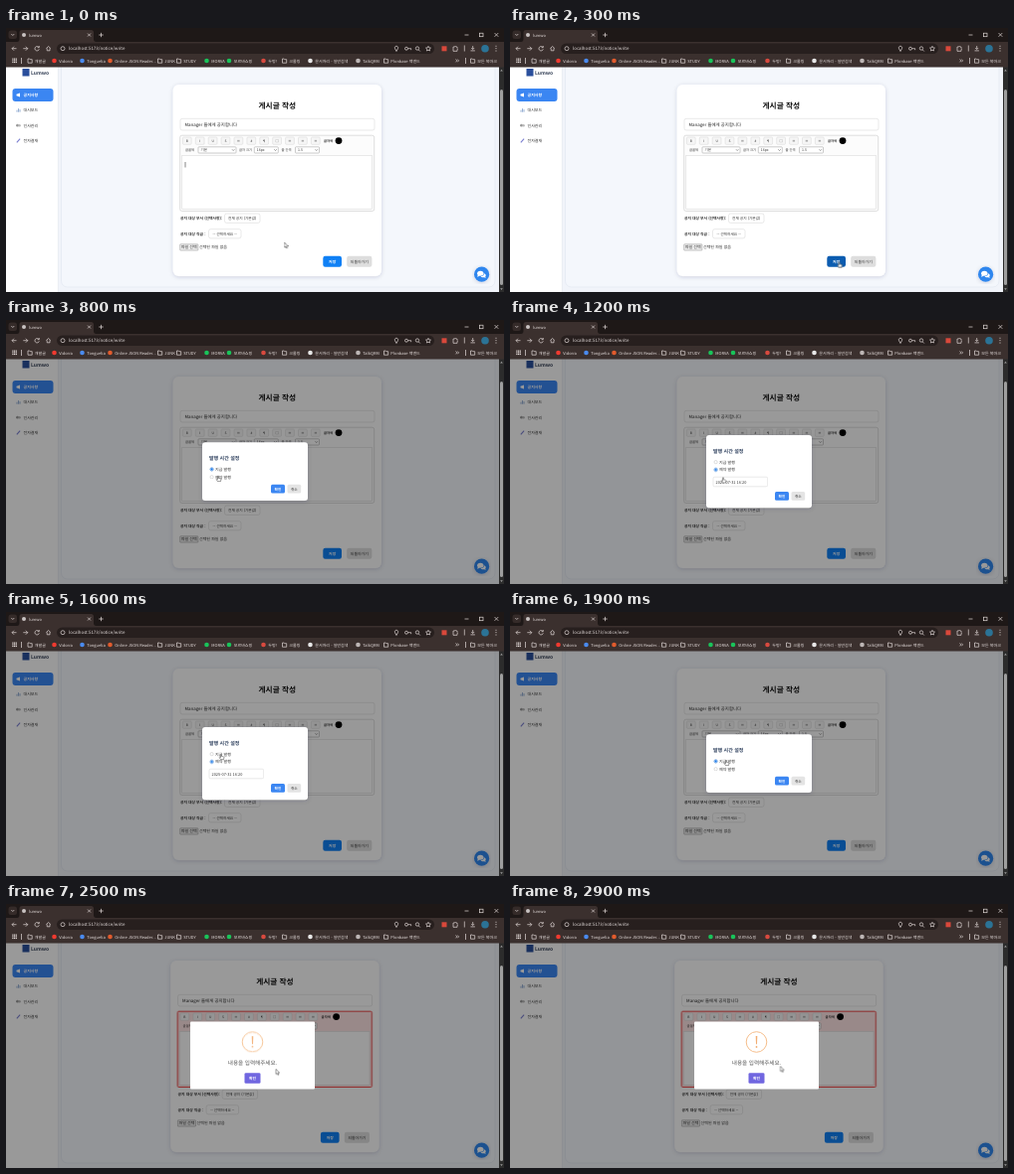
These frames come from a looping animation (500 by 266 pixels, 3 s). An HTML page:

```html
<!DOCTYPE html>
<html lang="ko">
<head>
<meta charset="utf-8">
<title>Notice editor</title>
<style>
html, body { margin: 0; width: 100%; height: 100%; overflow: hidden; background: #fff; }
svg { display: block; width: 100%; height: 100%; }
text { font-family: "Noto Sans CJK KR", "Noto Sans CJK", "Noto Sans", sans-serif; font-size: 4px; fill: #333; text-rendering: geometricPrecision; }
.bold { font-weight: 700; }
.mid { text-anchor: middle; }
.chrome text { fill: #e6dfde; }
.line { fill: none; stroke: #e2dad8; stroke-width: .7; }
.field { fill: #fff; stroke: #d3d3d3; stroke-width: .5; }
.white { fill: #fff; }
text.white { fill: #fff; }

/* one loop, held in 100 ms steps */
.move, #hand, #arrow, #caret, #save, #dim, #modal, #box, #head, #foot, #date, #dot, #card, #error, #alert, #icon, #mark {
  animation: 3s step-end infinite;
}
#caret { animation-name: caret; }
#save { fill: #0f80f5; animation-name: save; }
#dim { animation-name: dim; }
#modal { animation-name: modal; }
#box { animation-name: box; }
#head { animation-name: head; }
#foot { animation-name: foot; }
#date { animation-name: date; }
#dot { animation-name: dot; }
#card { animation-name: card; }
#error { animation-name: late; }
#alert { animation-name: alert; transform-origin: 247.5px 152.5px; }
#icon { animation-name: icon; transform-origin: 247.5px 139px; }
#mark { animation-name: mark; }
.move { animation-name: move; }
#hand { animation-name: hand; }
#arrow { animation-name: arrow; }

@keyframes caret { 0% { opacity: 1 } 3.33%, 100% { opacity: 0 } }
@keyframes save { 0% { fill: #0f80f5 } 6.66% { fill: #0b5cb0 } 20%, 100% { fill: #0f80f5 } }
@keyframes dim { 0% { opacity: 0 } 13.33%, 100% { opacity: 1 } }
@keyframes modal {
  0% { opacity: 0 }
  13.33% { opacity: .78; transform: matrix(1, 0, 0, 1, 0, -2.5) }
  16.66% { opacity: 1; transform: none }
  73.33%, 100% { opacity: 0 }
}
@keyframes box {
  0% { y: 123.3px; height: 58.7px }
  30% { y: 116px; height: 73.2px }
  56.66%, 100% { y: 123.3px; height: 58.7px }
}
@keyframes head { 0% { transform: none } 30% { transform: matrix(1, 0, 0, 1, 0, -7.3) } 56.66%, 100% { transform: none } }
@keyframes foot { 0% { transform: none } 30% { transform: matrix(1, 0, 0, 1, 0, 7.3) } 56.66%, 100% { transform: none } }
@keyframes date { 0% { opacity: 0 } 30% { opacity: 1 } 56.66%, 100% { opacity: 0 } }
@keyframes dot { 0% { transform: none } 30% { transform: matrix(1, 0, 0, 1, 0, 7.8) } 56.66%, 100% { transform: none } }
@keyframes card { 0% { transform: none } 73.33%, 100% { transform: matrix(1, 0, 0, 1, -2.4, 0) } }
@keyframes late { 0% { opacity: 0 } 73.33%, 100% { opacity: 1 } }
@keyframes alert {
  0% { opacity: 0; transform: scale(.7) }
  73.33% { opacity: 1; transform: scale(.7) }
  76.66% { opacity: 1; transform: scale(1.035) }
  80% { opacity: 1; transform: scale(.963) }
  83.33%, 100% { opacity: 1; transform: none }
}
@keyframes icon {
  0% { opacity: 0; transform: scaleY(.1) }
  76.66% { opacity: .35; transform: scaleY(.48) }
  80% { opacity: .7; transform: scaleY(.85) }
  83.33% { opacity: .9; transform: scaleY(.97) }
  86.66%, 100% { opacity: 1; transform: none }
}
@keyframes mark { 0% { opacity: 0 } 80%, 100% { opacity: 1 } }
@keyframes move {
  0% { transform: matrix(1, 0, 0, 1, 279.5, 216); animation-timing-function: steps(3) }
  10% { transform: matrix(1, 0, 0, 1, 330.5, 235.5) }
  16.66% { transform: matrix(1, 0, 0, 1, 330.5, 235.5); animation-timing-function: steps(3) }
  26.66% { transform: matrix(1, 0, 0, 1, 213, 157) }
  30% { transform: matrix(1, 0, 0, 1, 213, 157); animation-timing-function: steps(3) }
  40% { transform: matrix(1, 0, 0, 1, 214, 158.5) }
  46.66% { transform: matrix(1, 0, 0, 1, 214, 158.5); animation-timing-function: steps(2) }
  53.33% { transform: matrix(1, 0, 0, 1, 216, 143) }
  56.66% { transform: matrix(1, 0, 0, 1, 216, 143); animation-timing-function: steps(2) }
  63.33% { transform: matrix(1, 0, 0, 1, 217, 149); animation-timing-function: steps(2) }
  70% { transform: matrix(1, 0, 0, 1, 270, 170) }
  76.66% { transform: matrix(1, 0, 0, 1, 270, 172); animation-timing-function: steps(3) }
  86.66%, 100% { transform: matrix(1, 0, 0, 1, 271.5, 163.5) }
}
@keyframes hand { 0% { opacity: 0 } 6.66% { opacity: 1 } 16.66% { opacity: 0 } 26.66% { opacity: 1 } 73.33%, 100% { opacity: 0 } }
@keyframes arrow { 0% { opacity: 1 } 6.66% { opacity: 0 } 16.66% { opacity: 1 } 26.66% { opacity: 0 } 73.33%, 100% { opacity: 1 } }
</style>
</head>
<body>
<svg viewBox="0 0 500 266" preserveAspectRatio="none">
  <defs>
    <filter id="soft" x="-10%" y="-10%" width="120%" height="120%">
      <feDropShadow dx="0" dy="1" stdDeviation="2" flood-color="#203050" flood-opacity=".16"/>
    </filter>
  </defs>

  <!-- page -->
  <rect y="39" width="500" height="227" fill="#f1f4fa"/>
  <rect x="55.5" y="30" width="435.5" height="231" rx="6" fill="#f4f7fc" stroke="#e3e8f1" stroke-width=".7"/>
  <rect y="39" width="52" height="227" class="white"/>
  <path d="M52.3 39V266" stroke="#e3e7ee" stroke-width=".6"/>
  <rect x="16.5" y="41" width="7" height="7.5" fill="#2a4f9c"/>
  <text x="25" y="47.2" class="bold" style="font-size:5px;fill:#333f55">Lumwo</text>
  <rect x="6.5" y="61" width="41" height="13" rx="3" fill="#3b86f2"/>
  <g id="nav"></g>

  <g id="card">
    <rect x="167.7" y="57" width="209.3" height="193" rx="6" class="white" filter="url(#soft)"/>
    <text x="272.3" y="81.2" class="bold mid" style="font-size:7.7px;fill:#111">게시글 작성</text>
    <rect x="175" y="91.3" width="195" height="11.7" rx="2" class="field"/>
    <text x="179.5" y="99" style="font-size:4.4px;fill:#222">Manager 들에게 공지합니다</text>

    <rect x="174.7" y="108.2" width="195" height="76.3" rx="2" fill="#fcfcfc" stroke="#c9c9c9" stroke-width=".6"/>
    <rect id="error" x="174.7" y="108.2" width="195" height="76.3" rx="1" fill="#ffe3e3" stroke="#f04b4b" stroke-width="1"/>
    <rect x="176.8" y="128.3" width="190.8" height="54" class="field"/>
    <path id="caret" d="M180 135V140.5" stroke="#333" stroke-width=".6"/>
    <g id="tools"></g>
    <text x="319" y="115" class="bold" style="font-size:3.3px">글자색</text>
    <circle cx="334" cy="113.6" r="3.4" fill="#000"/>
    <g id="selects"></g>

    <text x="175" y="193.2" class="bold" style="font-size:3.8px">공지 대상 부서 (선택사항):</text>
    <rect x="219.5" y="187" width="35.5" height="9.4" rx="2" class="field"/>
    <text x="237.2" y="193" class="mid" style="font-size:3.7px">전체 공지 (기본값)</text>
    <text x="175" y="208.8" class="bold" style="font-size:3.8px">공지 대상 직급 :</text>
    <rect x="203.5" y="202.7" width="32.5" height="9.2" rx="2" class="field"/>
    <text x="219.7" y="208.6" class="mid" style="font-size:3.7px">-- 선택하세요 --</text>
    <rect x="174.7" y="217.8" width="18.2" height="6.3" rx=".6" fill="#ececec" stroke="#777" stroke-width=".4"/>
    <text x="183.8" y="222.4" class="mid">파일 선택</text>
    <text x="194" y="222.4">선택된 파일 없음</text>

    <rect id="save" x="318.3" y="229.8" width="18.7" height="11" rx="2.2"/>
    <text x="327.7" y="236.9" class="mid bold white" style="font-size:3.9px">저장</text>
    <rect x="342.2" y="229.8" width="25.2" height="11" rx="2.2" fill="#dedede"/>
    <text x="354.8" y="236.9" class="mid" style="font-size:3.9px">되돌아가기</text>
  </g>

  <g>
    <circle cx="477.6" cy="248.2" r="7.6" fill="#2f86ee" filter="url(#soft)"/>
    <ellipse cx="476.3" cy="247.2" rx="3.2" ry="2.5" class="white"/>
    <path d="M474 248.5l-1 2.3 3-1.1z" class="white"/>
    <path d="M480 247.2c2 .7 2.2 2.4 1.2 3.3l.6 1.3-2-.6c-1.5.3-2.7-.2-3.2-1 2 0 3.5-1.2 3.4-3z" class="white"/>
  </g>

  <rect id="dim" y="39" width="495" height="227" fill="rgba(0,0,0,.4)"/>

  <!-- publish time -->
  <g id="modal">
    <rect id="box" x="197" y="123.3" width="106" height="58.7" rx="3" class="white" filter="url(#soft)"/>
    <g id="head">
      <text x="204" y="141" class="bold" style="font-size:5px;fill:#2c3e5c">발행 시간 설정</text>
      <g class="white" stroke="#aaa" stroke-width=".4">
        <circle cx="206.6" cy="150.4" r="1.6"/>
        <circle cx="206.6" cy="158.2" r="1.6"/>
      </g>
      <g id="dot">
        <circle cx="206.6" cy="150.4" r="1.6" fill="#fff" stroke="#1a78e6" stroke-width=".5"/>
        <circle cx="206.6" cy="150.4" r="1.1" fill="#1a78e6"/>
      </g>
      <text x="210" y="151.9">지금 발행</text>
      <text x="210" y="159.7">예약 발행</text>
    </g>
    <g id="date">
      <rect x="204" y="158.2" width="54.7" height="9.6" rx="1.5" class="field"/>
      <text x="206.5" y="164.5" style="font-size:3.9px">2025-07-31 16:20</text>
    </g>
    <g id="foot">
      <rect x="266" y="165.8" width="14" height="8.7" rx="1.5" fill="#3b86f2"/>
      <text x="273" y="171.6" class="mid bold white" style="font-size:3.7px">확인</text>
      <rect x="282.5" y="165.8" width="13.7" height="8.7" rx="1.5" fill="#e4e4e4"/>
      <text x="289.3" y="171.6" class="mid" style="font-size:3.7px">취소</text>
    </g>
  </g>

  <!-- warning -->
  <g id="alert">
    <rect x="185" y="118.6" width="125" height="67.8" rx="1" class="white"/>
    <g id="icon">
      <circle cx="247.5" cy="139" r="10.3" fill="none" stroke="#f5bd8a" stroke-width="1"/>
      <g id="mark" fill="#f2ae74">
        <path d="M246.7 133h1.6l-.3 8.3h-1z"/>
        <circle cx="247.5" cy="144" r=".9"/>
      </g>
    </g>
    <text x="247.5" y="162.2" class="mid" style="font-size:5.6px;font-weight:500;fill:#545454">내용을 입력해주세요.</text>
    <rect x="239.5" y="170.2" width="16" height="10.6" rx="1.3" fill="#7066e0"/>
    <text x="247.5" y="176.9" class="mid bold white" style="font-size:3.9px">확인</text>
  </g>

  <!-- browser -->
  <rect x="495" y="39" width="5" height="227" fill="#2c2c2c"/>
  <path d="M496.2 43.5l1.3-1.8 1.3 1.8zM496.2 262.2l1.3 1.8 1.3-1.8z" fill="#9f9f9f"/>
  <rect x="496" y="62" width="3" height="197" rx="1.5" fill="#9f9f9f"/>
  <g class="chrome">
    <rect width="500" height="39.5" fill="#3b302e"/>
    <rect width="500" height="14" fill="#1e1817"/>
    <path d="M11 14q2.5 0 2.5-3V4.5q0-2.5 2.5-2.5H85.5q2.5 0 2.5 2.5V11q0 3 2.5 3z" fill="#3b302e"/>
    <rect x="2.5" y="2.5" width="8.5" height="8.5" rx="2.5" fill="#352b29"/>
    <path class="line" d="M5.3 6l1.5 1.5L8.3 6M82 5.5l3 3m0-3l-3 3M95.5 4.8v4.4M93.3 7h4.4M460.5 7h4M490.5 5l3.8 3.8m0-3.8l-3.8 3.8"/>
    <rect x="475.5" y="5.2" width="3.5" height="3.5" class="line"/>
    <circle cx="18" cy="7" r="2" fill="#c9c3c2"/>
    <text x="23" y="8.5">lumwo</text>

    <path class="line" d="M10.5 20.7H6m2-2l-2 2 2 2M17.3 20.7h4.5m-2-2l2 2-2 2M33 19.5a2.2 2.2 0 1 0 .3 1.8M33.3 18v1.7h-1.7M40.4 20.5l2.2-2 2.2 2M41.2 20.3v2.5h2.8v-2.5"/>
    <rect x="51" y="15.5" width="379" height="10.5" rx="5.2" fill="#271f1e"/>
    <circle cx="57" cy="20.7" r="2" class="line"/>
    <text x="63" y="22.3" style="font-size:4.4px">localhost:5173/notice/write</text>
    <path class="line" d="M392 23.5l-1.5-2.8a1.7 1.7 0 1 1 3 0zM403.5 20.7h3.2v1.5M414.3 22l1.5 1.5"/>
    <circle cx="402" cy="20.7" r="1.5" class="line"/>
    <circle cx="413" cy="20.5" r="1.7" class="line"/>
    <path class="line" d="M424 18.3l.8 1.6 1.7.2-1.3 1.2.3 1.7-1.5-.8-1.5.8.3-1.7-1.3-1.2 1.7-.2z"/>
    <rect x="437.5" y="18.3" width="5" height="5" fill="#d9483b"/>
    <path class="line" d="M449 19h1.5q.5-1.5 1.3 0H453v1.5q1.3.6 0 1.3V23.3h-4zM468.7 18v3.3m-1.5-1.3l1.5 1.5 1.5-1.5M466.5 22.9h4.4M460.3 17.5v6"/>
    <circle cx="481" cy="20.7" r="3.8" fill="#2b7396"/>
    <path d="M492 18.2v.1m0 2.3v.1m0 2.3v.1" stroke="#e2dad8" stroke-width="1" stroke-linecap="round"/>
    <g id="marks"></g>
    <path class="line" d="M451.5 31.5l1.3 1.4-1.3 1.4m1.8-2.8l1.3 1.4-1.3 1.4M461.5 30v6"/>
  </g>

  <g class="move" stroke="#222" stroke-width=".45" fill="#fff" stroke-linejoin="round">
    <path id="arrow" d="M0 0V5.2L1.2 4.1 2 6 2.9 5.6 2.1 3.8H3.7Z"/>
    <path id="hand" d="M-.5 .5Q0-.4 .5 .5V2.4L2.6 2.9Q3 3.1 2.9 3.7L2.5 5.6H-.5L-1.9 3.5Q-1.6 2.8-.5 3.6Z"/>
  </g>
</svg>
<script>
const fill = (id, html) => { document.getElementById(id).innerHTML = html; };
const label = (x, y, s, size, extra = '') => `<text x="${x}" y="${y}" style="font-size:${size}px" ${extra}>${s}</text>`;

fill('nav', ['공지사항', '대시보드', '인사관리', '전자결재'].map((s, i) => {
  const y = 67.6 + i * 15.3, on = i === 0;
  const icon = [
    `<path d="M10.5 ${y - .8}l3.5-1.3v4l-3.5-1.3z" fill="#fff"/>`,
    `<path d="M11 ${y + 1.8}v-2m1.5 2v-3.6m1.5 3.6v-2.6" stroke="#7d9cc9" stroke-width=".8"/>`,
    `<circle cx="11.5" cy="${y}" r="1.4" fill="#999"/><circle cx="13.6" cy="${y}" r="1.2" fill="#bbb"/>`,
    `<path d="M10.8 ${y + 1.8}l3.3-3.6" stroke="#7b7fd0" stroke-width="1.1"/>`
  ][i];
  return icon + label(17.5, y + 1.5, s, 4, on ? 'class="bold white"' : '');
}).join(''));

fill('tools', [...'BIUS≡#¶□≡≡≡'].map((s, i) => {
  const x = 181.8 + i * 12.9;
  return `<rect x="${x - 4.4}" y="110" width="8.8" height="7.3" rx="1" fill="#f6f6f6" stroke="#ccc" stroke-width=".4"/>`
    + label(x, 114.9, s, 3.3, 'class="mid"');
}).join(''));

fill('selects', [[180, '글꼴체', 193, 38, '기본'], [234, '글자 크기', 249.3, 24, '16px'], [276.5, '줄 간격', 290.5, 24, '1.5']]
  .map(([lx, name, x, w, value]) => label(lx, 124.3, name, 3.3)
    + `<rect x="${x}" y="119.8" width="${w}" height="6.2" rx=".8" class="field" style="stroke:#999"/>`
    + label(x + 2.5, 124.3, value, 3.5)
    + `<path d="M${x + w - 4} 122.3l1.2 1.2 1.2-1.2" fill="none" stroke="#333" stroke-width=".5"/>`).join(''));

const folder = x => `<path class="line" d="M${x - 2} 31h1.7l.6.7h1.9v3.5h-4.2z"/>`;
const marks = [
  [24, '', '개발글'], [48.5, '#f03a30', 'Vidorra'], [76.5, '#4a8bf0', 'Tonguelia'],
  [104.5, '#e25b2d', 'Online JSON Reader...'], [154.5, '', 'JUNK'], [173.5, '', 'STUDY'],
  [201.5, '#19c45a', 'MORVA'], [224, '#19c45a', '모르바쇼핑'], [258.5, '#d94a3f', '두펑!'],
  [279.5, '', '크롤링'], [305.5, '#e8e8e8', '문서처리 - 일반검색'], [353.5, '#bdb6b5', 'TalkQRM'],
  [381.5, '', 'Plonbase 백엔드'], [468.5, '', '모든 북마크']
];
let grid = '';
for (let i = 0; i < 9; i++) grid += `<rect x="${6.3 + i % 3 * 1.7}" y="${30.5 + Math.floor(i / 3) * 1.7}" width="1.2" height="1.2" fill="#e2dad8"/>`;
fill('marks', grid + '<path class="line" d="M15.5 30v6"/>' + marks.map(([x, color, s]) =>
  (color ? `<circle cx="${x}" cy="33" r="2.3" fill="${color}"/>` : folder(x)) + label(x + 4.8, 34.5, s, 4)).join(''));
</script>
</body>
</html>
```
